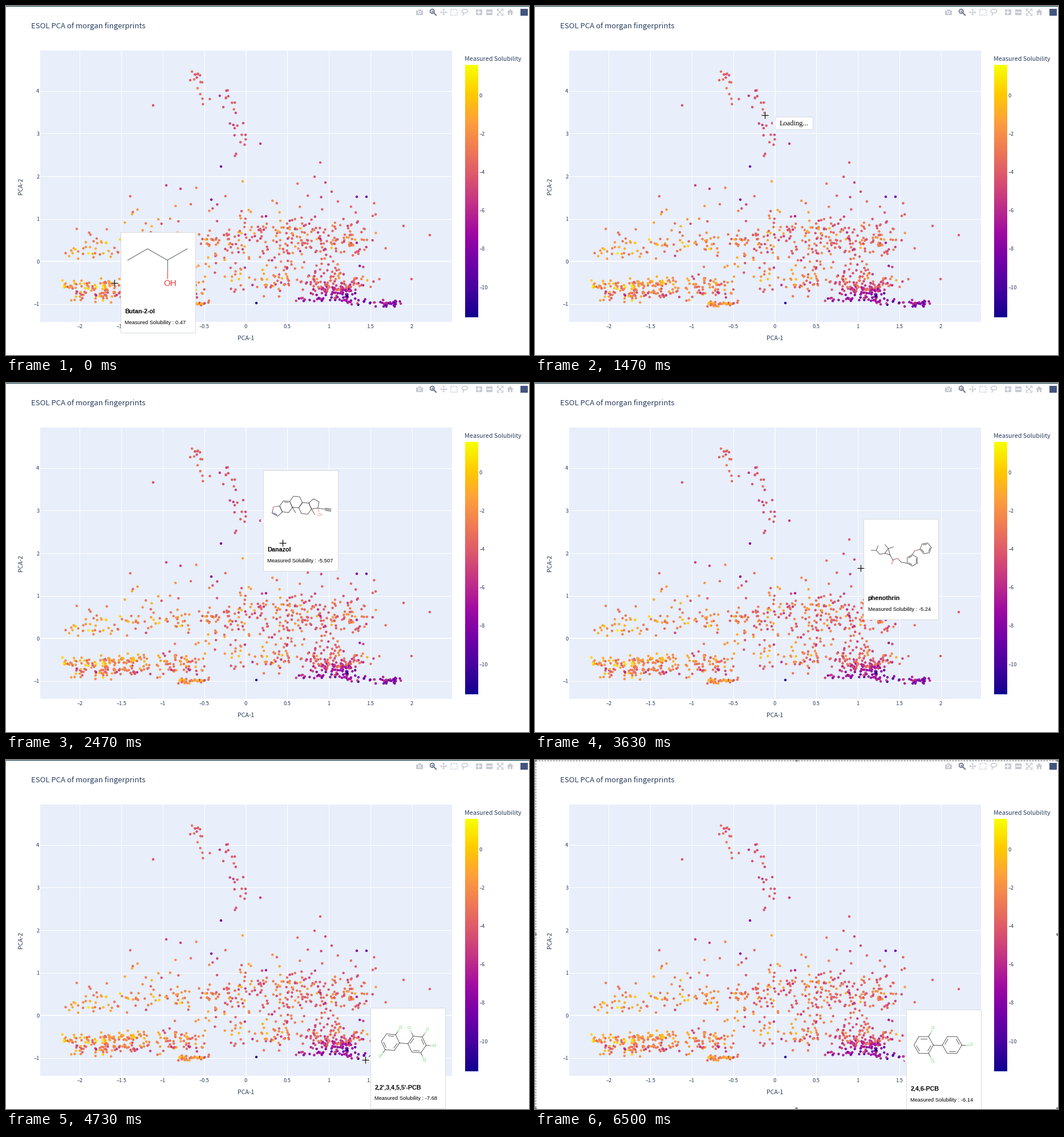
Recreate the animation shown at these times as a matplotlib script. Size 917 by 611 pixels, loop 6.7 s.

```python
import numpy as np
import matplotlib.pyplot as plt
from matplotlib.animation import FuncAnimation
from matplotlib.colors import LinearSegmentedColormap
from matplotlib.patches import Circle, Ellipse, Polygon, Rectangle

W, H, DPI = 917, 611, 64
LOOP, STEP, DELAY = 6700, 50, 200
PX = 72 / DPI  # points per pixel
INK, SANS, CARD_FONT = "#2a3f5f", "Noto Sans CJK JP", "Liberation Sans"
BOND, RED, PINK, BLUE, GREEN = "#4a4a4a", "#e23b36", "#f58a86", "#6b6bea", "#78dc78"
VMIN, VMAX = -11.6, 1.57

plasma = LinearSegmentedColormap.from_list("plasma_bright", [
    "#120091", "#46039f", "#7201a8", "#9f0aa2", "#c03088",
    "#dc556d", "#ef7a55", "#fda03c", "#ffcb00", "#f7ff00"])

fig = plt.figure(figsize=(W / DPI, H / DPI), dpi=DPI, facecolor="white")
ax = fig.add_axes([0, 0, 1, 1])
ax.set_xlim(0, W)
ax.set_ylim(H, 0)
ax.axis("off")


def line(pts, color=BOND, width=1.0, z=3, **kw):
    x, y = zip(*pts)
    return ax.plot(x, y, color=color, lw=width * PX, zorder=z, **kw)[0]


def rect(x0, y0, x1, y1, color, z=1, edge="none", width=0):
    return ax.add_patch(Rectangle((x0, y0), x1 - x0, y1 - y0, facecolor=color,
                                  edgecolor=edge, lw=width * PX, zorder=z))


def disc(x, y, r, color, z=3):
    return ax.add_patch(Circle((x, y), r, color=color, lw=0, zorder=z))


def text(x, y, s, size, color=INK, font=SANS, z=3, **kw):
    return ax.text(x, y, s, fontsize=size * PX, color=color, family=font, zorder=z, **kw)


def num(v):
    return f"{v:g}".replace("-", "–")


def polar(r, deg):
    a = np.radians(deg)
    return np.stack([r * np.cos(a), r * np.sin(a)], axis=-1)


# ---- plot area, axes and colour bar ----
def draw_chart():
    rect(60, 78, 782, 553, "#e8eefa", z=0)
    for v in np.arange(-2, 2.1, 0.5):
        x = 420.5 + 145.6 * v
        line([(x, 78), (x, 553)], "white", 1.6 if v == 0 else 1, z=1)
        text(x, 563.5, num(v), 9.3, ha="center")
    for v in range(-1, 5):
        y = 447.2 - 74.6 * v
        line([(60, y), (782, y)], "white", 1.8 if v == 0 else 1, z=1)
        text(58.5, y + 3.5, num(v), 9.3, ha="right")
    text(44, 39.5, "ESOL PCA of morgan fingerprints", 13.1)
    text(420.5, 585, "PCA-1", 10.5, ha="center")
    text(26.5, 315, "PCA-2", 10.5, rotation=90, ha="center", va="center")
    text(804.5, 95.7, "Measured Solubility", 10.75)
    ax.imshow(np.linspace(1, 0, 442)[:, None], cmap=plasma, aspect="auto",
              extent=(804.5, 827.5, 545.5, 103.5), zorder=1)
    for v in range(-10, 1, 2):
        text(829.5, 160 - 33.55 * v, num(v), 9.3)


# ---- points ----
# single points: x, y, solubility
ACCENTS = [(258, 174, -4.5), (446, 241, -5.5), (377, 281, -8.5), (415, 307, -1.2),
           (281, 314, -5), (306, 320, -5.2), (551, 274, -4), (541, 299, -4.2),
           (560, 309, -4.8), (571, 325, -4.6), (632, 334, -8.8), (615, 334, -8),
           (360, 339, -8), (697, 385, -4), (743, 401, -4), (711, 478, -4),
           (439, 520, -11), (381, 177, -4.4), (416, 205, -4.6)]
# count, start, end and jitter of a streak
STREAKS = [
    (16, 328, 108, 352, 176, 7),
    (22, 386, 145, 416, 248, 11),
    (85, 108, 422, 322, 414, 13),
    (26, 340, 408, 392, 405, 6),
    (95, 98, 491, 246, 484, 5),
    (74, 120, 508, 250, 503, 5),
    (70, 265, 494, 345, 490, 12),
    (36, 298, 522, 355, 521, 2),
    (36, 345, 420, 425, 490, 20),
    (60, 200, 372, 660, 376, 30),
    (205, 400, 412, 632, 406, 20),
    (125, 440, 478, 640, 478, 14),
    (85, 540, 494, 612, 497, 7),
    (30, 505, 512, 605, 514, 3),
    (46, 602, 518, 690, 522, 2.5)]


def solubility(x, y):
    trend = -1.3 - 0.0045 * (x - 100)
    upper = 1.6 * np.clip((400 - y) / 150, 0, 1)
    band = 1.8 * np.exp(-((y - 506) / 8) ** 2)
    corner = 4 * np.clip((y - 480) / 40, 0, 1) / (1 + np.exp((520 - x) / 25))
    return trend - upper - band - corner


def draw_points():
    rng = np.random.default_rng(12)
    parts = [np.array(ACCENTS)]
    for n, x0, y0, x1, y1, jitter in STREAKS:
        u = rng.random(n)
        x = x0 + (x1 - x0) * u + rng.normal(0, min(jitter, 8), n)
        y = np.minimum(y0 + (y1 - y0) * u + rng.normal(0, jitter, n), 526)
        spread = 0.6 if y1 < 300 else 1.3
        parts.append(np.column_stack([x, y, solubility(x, y) + rng.normal(0, spread, n)]))
    x, y, v = rng.permutation(np.vstack(parts)).T
    ax.scatter(x, y, c=np.clip(v, VMIN, 1), cmap=plasma, vmin=VMIN, vmax=VMAX,
               s=(4.4 * PX) ** 2, linewidths=0, zorder=2)


# ---- toolbar ----
def draw_toolbar():
    g, dark = "#c6cad2", "#727c8e"
    signs = np.array([(1, 1), (1, -1), (-1, 1), (-1, -1)])
    # camera
    rect(719, 7.5, 731, 15.5, g)
    rect(722.5, 6, 727.5, 8, g)
    disc(725, 11.3, 2.7, "white", 2)
    disc(725, 11.3, 1.5, g)
    # zoom
    ax.add_patch(Circle((747.3, 9.3), 3.6, fc="white", ec=dark, lw=1.9 * PX, zorder=2))
    line([(750, 12), (754, 16)], dark, 2.2)
    line([(745.5, 9.3), (749.1, 9.3)], dark, 1)
    line([(747.3, 7.5), (747.3, 11.1)], dark, 1)
    # pan
    for deg in range(0, 360, 90):
        tip, hub = polar(6, deg), np.array([767.2, 10.6])
        line([hub, hub + tip * 0.8], g, 1.3)
        ax.add_patch(Polygon([hub + tip, hub + polar(4.1, deg + 34),
                              hub + polar(4.1, deg - 34)], color=g, lw=0))
    # box and lasso
    ax.add_patch(Rectangle((780, 5.5), 11, 10.5, fc="none", ec=g, lw=1.5 * PX,
                           ls=(0, (1.5, 1.1))))
    ax.add_patch(Ellipse((804.5, 9), 10.5, 6.5, fc="none", ec=g, lw=1.5 * PX))
    line([(800.5, 11.5), (802.5, 13.5), (801, 16.5)], g, 1.4)
    # zoom in and out
    for x in (829, 847.5):
        rect(x - 5.5, 5.5, x + 5.5, 16, g)
        line([(x - 3.3, 10.8), (x + 3.3, 10.8)], "white", 1.7)
    line([(829, 7.5), (829, 14.1)], "white", 1.7)
    # autoscale
    for s in signs:
        hub = np.array([866, 10.8])
        corner = hub + 5.4 * s
        line([hub, hub + 3.6 * s], g, 1.4)
        line([corner - (3 * s[0], 0), corner, corner - (0, 3 * s[1])], g, 1.4)
    # home
    ax.add_patch(Polygon([(878, 11), (884, 5.3), (890, 11)], color=g, lw=0))
    rect(880, 10.5, 888, 16, g)
    rect(882.8, 12.3, 885.3, 16, "white", 2)
    rect(902, 4.5, 915, 16.5, "#43557f")


# ---- molecules, in coordinates of the card ----
class Sketch:
    def __init__(self, x, y):
        self.origin, self.parts = np.array([x, y]), []

    def bond(self, *pts, color=BOND, width=0.9):
        self.parts.append(line(self.origin + np.array(pts), color, width, z=7))

    def label(self, x, y, s, size, color, **kw):
        x, y = self.origin + (x, y)
        self.parts.append(text(x, y, s, size, color, CARD_FONT, z=7, **kw))

    def atom(self, x, y, s, size, color):
        self.label(x, y, s, size, color, ha="center", va="center")

    def ring(self, center, r, rot, n=6, double=()):
        v = center + polar(r, rot + 360 / n * np.arange(n + 1))
        self.bond(*v)
        inner = center + 0.78 * (v - center)
        for i in double:
            d = inner[i + 1] - inner[i]
            self.bond(inner[i] + 0.1 * d, inner[i + 1] - 0.1 * d)
        return v


def butanol(m):
    x, y = 13 + 34.7 * np.arange(4), np.array([49, 29, 49, 29])
    m.bond(*zip(x, y), color="#666a6e", width=1.1)
    m.bond((x[2], 49), (x[2], 66), color="#666a6e", width=1.1)
    m.bond((x[2], 66), (x[2], 81), color=RED, width=1.1)
    m.atom(87.5, 90, "OH", 15, RED)


def steroid(m, r=11.2, tilt=-25):
    a = np.array([40.5, 63.5])
    b = a + polar(r * 3 ** 0.5, tilt)
    c = b + polar(r * 3 ** 0.5, tilt + 60)
    d = c + polar(r * 1.554, tilt)
    hexes = [m.ring(p, r, tilt + 30, double=k) for p, k in ((a, (4,)), (b, ()), (c, ()))]
    tail = m.ring(d, r * 0.85, tilt + 216, n=5)
    for joint in (hexes[0][0], tail[4]):
        m.bond(joint, joint + polar(r, 60))
    return a, tail[3]


def danazol(m):
    a, end = steroid(m)
    v = m.ring(a + polar(17.4, 155), 9.5, 11, n=5, double=(1,))
    mid = (v[:-1] + v[1:]) / 2
    m.bond(mid[1], v[2], mid[2], color=BLUE)
    m.bond(mid[2], v[3], mid[3], color=PINK)
    m.bond(end, end + (23, 3.5))
    for dy in (-2, 2):
        m.bond(end + (13, 2 + dy), end + (23, 3.5 + dy))
    m.bond(end, end + (2, 7), color=PINK)
    m.atom(*(end + (4, 12)), "OH", 6.5, PINK)


def pyrethroid(m):
    m.ring((109.5, 51.5), 10, -10, double=(0, 2, 4))
    v = m.ring((86, 72.5), 10, 30, double=(1, 3, 5))
    m.bond(v[4], (90, 56), (100, 53))
    m.bond((88.5, 59), (90, 56), (95, 54.5), color=PINK)
    m.bond(v[2], (67, 76), (60, 69), (52, 72), (47, 63), (38, 60), (44, 52), (47, 63))
    m.bond((63.5, 72.5), (60, 69), (56, 70.5), color=PINK)
    for dx in (-0.8, 1.2):
        m.bond((52 + dx, 72), (50 + dx, 79), color=PINK)
    m.bond((38, 45), (44, 52), (53, 49))
    m.bond((38, 60), (29, 62), (23, 55), (14, 55))
    m.bond((23, 55), (26, 47))


def biphenyl(center, r, rot, left, right):
    def draw(m):
        a = np.array(center)
        b = a + polar(2.93 * r, rot)
        m.bond(a + polar(r, rot), b - polar(r, rot))
        for c, sites, double in ((a, left, (0, 2, 4)), (b, right, (1, 3, 5))):
            m.ring(c, r, rot, double=double)
            for k in sites:
                ray = polar(r, rot + 60 * k)
                m.bond(c + ray, c + 1.4 * ray)
                m.bond(c + 1.4 * ray, c + 1.75 * ray, color=GREEN)
                m.atom(*(c + 1.98 * ray), "Cl", 6.8, GREEN)
    return draw


# ---- tooltips ----
def bubble(px, py, w, h):
    x, y = px + 4.5, py - h / 2
    tail = ax.add_patch(Polygon([(px, py), (x + 1, py - 4.5), (x + 1, py + 4.5)],
                                facecolor="white", lw=0, zorder=6.5))
    return x, y, [rect(x, y, x + w, y + h, "white", 6, "#d5d8de", 0.9), tail]


def card(px, py, name, value, molecule):
    x, y, parts = bubble(px, py, 131, 176)
    m = Sketch(x, y)
    molecule(m)
    m.label(8, 142, name, 10.7, "black", weight="bold")
    m.label(8, 160.8, f"Measured Solubility : {value}", 9.2, "black")
    return parts + m.parts


def loading(px, py):
    x, y, parts = bubble(px, py, 66, 22)
    return parts + [text(x + 8, py + 4.2, "Loading...", 12.4, "black", "Liberation Serif", z=7)]


# arrival, departure, point and, once loaded, the card
HOVERS = [
    (-DELAY, 450, 196, 484, "Butan-2-ol", "0.47", butanol),
    (1400, 1600, 416, 205),
    (1650, 2000, 381, 177, "Progesterone", "-4.42", steroid),
    (2100, 2700, 446, 241, "Danazol", "-5.507", danazol),
    (2700, 3150, 541, 299, "resmethrin", "-4.8", pyrethroid),
    (3150, 3400, 560, 309, "cyphenothrin", "-5.0", pyrethroid),
    (3400, 4000, 571, 326, "phenothrin", "-5.24", pyrethroid),
    (4150, 4850, 634, 522, "2,2',3,4,5,5'-PCB", "-7.68",
     biphenyl((35.5, 60), 16, 5, (5, 2), (4, 5, 0, 1))),
    (5000, 5200, 632, 524),
    (5200, LOOP, 646, 525, "2,4,6-PCB", "-6.14",
     biphenyl((31, 62), 17, 0, (5, 1), (0,))),
]


def build_tips():
    tips = []
    for start, end, x, y, *info in HOVERS:
        tips.append((start, start + DELAY, loading(x, y)))
        if info:
            tips.append((start + DELAY, end, card(x, y, *info)))
    return tips


# ---- pointer and capture frame ----
# time, x, y
PATH = np.array([
    (0, 190, 485), (430, 190, 485), (1470, 403, 191), (1800, 384, 179), (2000, 386, 182),
    (2470, 486, 281), (2800, 541, 299), (3400, 571, 324), (3950, 572, 325),
    (4250, 628, 522), (4700, 630, 525), (5100, 637, 528), (5400, 641, 525),
    (LOOP, 641, 525)], float)


def pointer(t):
    i = min(np.searchsorted(PATH[:, 0], t, side="right"), len(PATH) - 1)
    a, b = PATH[i - 1], PATH[i]
    u = (t - a[0]) / (b[0] - a[0])
    return (a + (b - a) * u * u * (3 - 2 * u))[1:]


def build_frame():
    edge = ax.add_patch(Rectangle((0.5, 0.5), W - 1, H - 1, fc="none", ec="#5c5c5c",
                                  lw=PX, ls=(0, (3, 2)), zorder=10))
    return [edge] + [disc(x, y, 2.3, "#8a8a8a", 11)
                     for x in (1, W / 2, W - 1) for y in (1, H / 2, H - 1)
                     if (x, y) != (W / 2, H / 2)]


draw_chart()
draw_points()
draw_toolbar()
tips = build_tips()
top_bar = rect(0, 0, W, 1.3, "#00343f", z=9)
capture = build_frame()
cross = [line([(0, 0), (1, 1)], c, w, z=8, solid_capstyle="butt")
         for c, w in (("white", 2.6), ("white", 2.6), ("black", 1.2), ("black", 1.2))]


def update(k):
    t = k * STEP
    for start, end, parts in tips:
        for p in parts:
            p.set_visible(start <= t < end)
    captured = t >= 6150
    top_bar.set_visible(not captured)
    for p in capture:
        p.set_visible(captured)
    x, y = pointer(t)
    for i, arm in enumerate(cross):
        dx, dy = (0, 6) if i % 2 else (6, 0)
        arm.set_data([x - dx, x + dx], [y - dy, y + dy])
        arm.set_visible(t < 6400)
    return cross


anim = FuncAnimation(fig, update, frames=LOOP // STEP, interval=STEP,
                     repeat=True, repeat_delay=0, blit=False)
plt.show()
```
